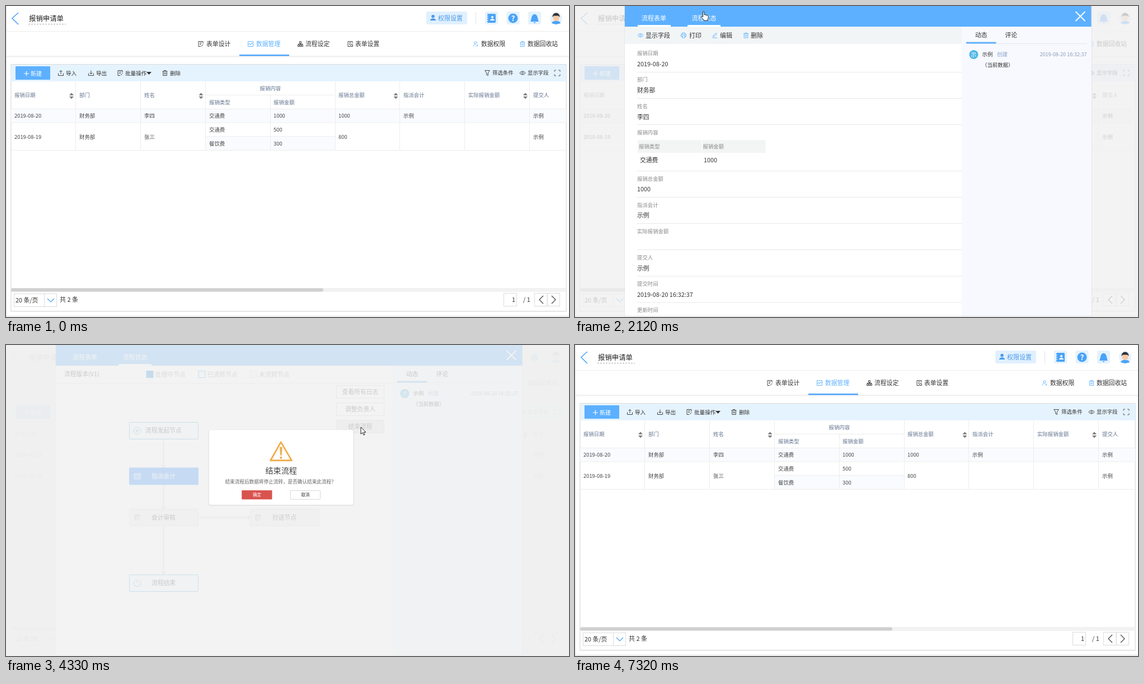
Animation of 1006 by 557 pixels, one loop 8.03 s. Source, as an HTML page:

```html
<!DOCTYPE html>
<html lang="zh-CN">
<head>
<meta charset="utf-8">
<title>报销申请单</title>
<style>
html, body { margin: 0; width: 100%; height: 100%; overflow: hidden; background: #fff; }
svg { display: block; width: 1006px; height: 557px; }
text { font-family: "Noto Sans CJK SC", "Noto Sans CJK", sans-serif; }
#dialog { transform-origin: 491.7px 219px; }
</style>
</head>
<body>
<svg id="stage" viewBox="0 0 1006 557"></svg>
<script>
const BLUE = '#5cb0ff', INK = '#333', GREY = '#888', LINE = '#ededed';
const SMALL = 9.4, BODY = 10.8;

// --- drawing helpers: text is placed by its vertical centre ---
const text = (x, cy, str, size = BODY, fill = INK, anchor = 'start', extra = '') =>
  `<text x="${x}" y="${cy + size * .37}" font-size="${size}" fill="${fill}" text-anchor="${anchor}" ${extra}>${str}</text>`;
const rect = (x, y, w, h, fill, extra = '') =>
  `<rect x="${x}" y="${y}" width="${w}" height="${h}" fill="${fill}" ${extra}/>`;
const box = (x, y, w, h, stroke, fill = '#fff', extra = '') =>
  rect(x + .5, y + .5, w - 1, h - 1, fill, `stroke="${stroke}" ${extra}`);
const path = (d, stroke, width = 1, extra = 'fill="none"') =>
  `<path d="${d}" stroke="${stroke}" stroke-width="${width}" ${extra}/>`;
const hline = (x1, x2, y, color = LINE) => path(`M${x1} ${y}H${x2}`, color);
const vline = (x, y1, y2, color = LINE) => path(`M${x} ${y1}V${y2}`, color);
const group = (id, body) => `<g id="${id}">${body}</g>`;

// Line icons in a 10 x 10 cell, centred on (x + 5, cy)
const ICONS = {
  form: 'M9 4V.5H1V9.5H5M3 3H7M3 5.5H6M6 9L9.5 5.5',
  chart: 'M.5 .5H9.5V9.5H.5ZM1 6L3 4L5 7L7 3L9 5',
  tree: 'M3.5 .5H6.5V3.5H3.5ZM5 3.5V6.5M1.5 6.5V5H8.5V6.5M.5 6.5H3V9.5H.5ZM3.8 6.5H6.2V9.5H3.8ZM7 6.5H9.5V9.5H7Z',
  cog: 'M9 4V.5H1V9.5H5M3 3H7M3 5.5H5M6 6H9.5V9.5H6Z',
  user: 'M3 3A2.3 2.3 0 1 1 7 4.5C4 5 1.5 6.5 1 9.5M3 3C3 4.5 4 5 5 5M6 9.5L9.5 6M9.5 9.5L7 7',
  bin: 'M.5 2H9.5M3.5 2V.5H6.5V2M1.7 2V9.5H8.3V2M4 4V7.5M6 4V7.5',
  up: 'M.5 5.5V9.5H9.5V5.5M5 7V.5M2.5 3L5 .5L7.5 3',
  down: 'M.5 5.5V9.5H9.5V5.5M5 .5V7M2.5 4.5L5 7L7.5 4.5',
  filter: 'M.7 .5H9.3L6.3 5V9.5L3.7 8V5Z',
  eye: 'M0 5C2.5 1 7.5 1 10 5C7.5 9 2.5 9 0 5ZM5 3.5A1.5 1.5 0 1 1 4.9 3.5',
  expand: 'M0 3V0H3M7 0H10V3M10 7V10H7M3 10H0V7',
  print: 'M2.5 3V.5H7.5V3M2.5 7H.5V3H9.5V7H7.5M2.5 5.5H7.5V9.5H2.5Z',
  pen: 'M.5 9.5H9.5M1.5 7.5L2 5.5L7 .8L8.7 2.5L3.7 7Z',
  play: 'M5 -1A6 6 0 1 1 4.9 -1M3.5 2.5V7.5L7.5 5Z',
  power: 'M2 0A6 6 0 1 0 8 0M5 -1V4',
  grid: 'M-.5 1H10.5V10H-.5ZM-.5 3.5H10.5M2 5V9M5 5V9M8 5V9M2.5 -1V1M7.5 -1V1'
};
const icon = (name, x, cy, color = '#444') =>
  `<g transform="translate(${x} ${cy - 5})">${path(ICONS[name], color, .9)}</g>`;
const item = (name, x, tx, cy, label, size, color = INK, tint = color) =>
  icon(name, x, cy, tint) + text(tx, cy, label, size, color);

// --- list page ---
function header() {
  const tile = x => rect(x, 10, 23, 23, '#e4f2fe', 'rx="3"');
  return path('M22 12L11 22L22 33', '#4ba3f5', 1.6) +
    text(41, 22, '报销申请单', 12.4, '#222') +
    path('M40 32.5H107', '#aaa', 1, 'stroke-dasharray="3 2"') +
    rect(751, 10, 73, 23, '#e0f0fe', 'rx="3"') +
    '<circle cx="763" cy="18.5" r="2.8" fill="#4a9ae8"/>' +
    path('M758 26C758 21 768 21 768 26Z', 'none', 0, 'fill="#4a9ae8"') +
    text(772, 21.5, '权限设置', 11, '#4a9ae8') +
    vline(839.5, 11, 33, '#e3e3e3') +
    [856, 894.5, 933].map(tile).join('') +
    rect(860, 14, 15, 16, '#4aa3f7', 'rx="1.5"') + '<circle cx="869" cy="20" r="2" fill="#fff"/>' +
    path('M865 26C865 22 873 22 873 26Z', 'none', 0, 'fill="#fff"') +
    path('M859 18H862M859 22H862M859 26H862', '#fff', 1) +
    '<circle cx="906" cy="22" r="8.5" fill="#4aa3f7"/>' +
    text(906, 22, '?', 13, '#fff', 'middle', 'font-weight="700"') +
    path('M937 28C939 26 938 15 944.500 14.500C951 15 950 26 952 28ZM942 29H947L944.500 31Z', 'none', 0, 'fill="#4aa3f7"') +
    '<circle cx="983" cy="22" r="11" fill="#e4f2fe"/>' +
    path('M975 31C976 25 990 25 991 31L983 33Z', 'none', 0, 'fill="#4aa3f7"') +
    '<circle cx="983" cy="21.500" r="5.500" fill="#f8c9a4"/>' +
    path('M976.500 20C976 10 990 10 989.500 20L987 17.500H979Z', 'none', 0, 'fill="#30303a"') +
    hline(0, 1006, 45.5) +
    item('form', 343, 358, 68, '表单设计') +
    item('chart', 432, 447, 68, '数据管理', BODY, BLUE) +
    item('tree', 521, 535, 68, '流程设定') +
    item('cog', 610, 624, 68, '表单设置') +
    item('user', 834, 849, 68, '数据权限', BODY, INK, BLUE) +
    item('bin', 918, 932, 68, '数据回收站', BODY, INK, BLUE) +
    hline(0, 1006, 90, '#e4e4e4') + hline(0, 1006, 91.5, '#f5f5f5') +
    rect(417, 87, 89, 2.5, '#4ba5fb');
}

function toolbar() {
  return rect(9, 105, 992, 30, '#e5f3fe') +
    rect(17, 108, 62, 24, BLUE, 'rx="1"') +
    path('M32 121H41M36.5 116.500V125.500', '#fff', 1.2) +
    text(44, 121, '新建', 10, '#fff') +
    item('up', 93, 107, 120, '导入', 9.6) +
    item('down', 147, 161, 120, '导出', 9.6) +
    item('form', 199, 213, 120, '批量操作', 9.6) +
    path('M251 118H260L255.500 123Z', 'none', 0, 'fill="#333"') +
    item('bin', 279, 293, 120, '删除', 9.6) +
    item('filter', 855, 869, 120, '筛选条件', SMALL) +
    item('eye', 918, 932, 120, '显示字段', SMALL) +
    icon('expand', 980, 120, '#555');
}

function table() {
  const cell = (x, y, str, color = '#444') => text(x, y, str, SMALL, color);
  const head = (x, y, str) => cell(x, y, str, '#62748f');
  const sorter = x => path(`M${x - 4} 160L${x} 155.500L${x + 4} 160ZM${x - 4} 162L${x} 166.500L${x + 4} 162Z`, 'none', 0, 'fill="#7d7d7d"');
  const rows = [
    [197, [15, '2019-08-20'], [131, '财务部'], [247, '李四'], [363, '交通费'], [478, '1000'], [594, '1000'], [710, '示例'], [942, '示例']],
    [222, [363, '交通费'], [478, '500']],
    [234.5, [15, '2019-08-19'], [131, '财务部'], [247, '张三'], [594, '800'], [942, '示例']],
    [247, [363, '餐饮费'], [478, '300']]
  ];
  return rect(9, 184, 992, 25, '#f9fbfe', 'id="row"') + rect(356, 234, 232, 24, '#f9fbfe') +
    [124.5, 240.5, 356.5, 588.5, 703.5, 819.5, 935.5].map(x => vline(x, 135, 258)).join('') +
    vline(472.5, 160, 258) + hline(356, 588, 159.5) + hline(356, 588, 233.5) +
    [184.5, 209, 258.5].map(y => hline(9, 1001, y)).join('') +
    [[15, '报销日期'], [131, '部门'], [247, '姓名'], [594, '报销总金额'], [710, '指派会计'], [826, '实际报销金额'], [942, '提交人']]
      .map(([x, s]) => head(x, 160, s)).join('') +
    head(453.5, 147.5, '报销内容') + head(363, 172.5, '报销类型') + head(478, 172.5, '报销金额') +
    [117, 348.5, 696.5, 928].map(sorter).join('') +
    rows.map(([y, ...cells]) => cells.map(([x, s]) => cell(x, y, s)).join('')).join('');
}

function footer() {
  return rect(9, 505, 992, 7, '#f2f2f2') + rect(9, 505.5, 558, 6, '#d0d0d0', 'rx="3"') +
    box(14, 515, 77, 24, '#dcdcdc') + vline(68.5, 516, 538, '#dcdcdc') +
    path('M74 524L80 530L86 524', '#4aa3f7', 1.2) +
    text(17, 527.5, '20 条/页') + text(96, 526, '共 2 条', 11) +
    box(889, 514, 24, 24, '#dcdcdc') + text(904, 526, '1') + text(924, 526, '/ 1') +
    box(944, 514, 23.5, 24, '#dcdcdc') + box(967, 514, 23, 24, '#dcdcdc') +
    path('M960 519L953 526L960 533M975 519L982 526L975 533', '#444', 1.2);
}

const listPage = () => header() +
  rect(8, 104, 994, 444, '#f0f0f0', 'rx="2"') + box(8.5, 104, 993, 443, '#dadada') +
  toolbar() + table() + footer() +
  vline(.5, 0, 557, '#e2e2e2') + hline(0, 1006, 555.5, '#d8d8d8');

// --- record panel ---
function formView() {
  const fields = [
    [85, '报销日期', '2019-08-20', 118.5], [132, '部门', '财务部', 165.5], [180, '姓名', '李四', 212.5],
    [227, '报销内容', '', 295.5], [309.5, '报销总金额', '1000', 342.5], [356.5, '指派会计', '示例', 389.5],
    [404, '实际报销金额', '', 436.5], [451, '提交人', '示例', 484], [498, '提交时间', '2019-08-20 16:32:37', 531],
    [545, '更新时间', '', 600]
  ];
  return rect(89, 37, 602, 31, '#f1f5f6') +
    item('eye', 112, 126, 52.5, '显示字段', 11, INK, BLUE) + item('print', 189, 204, 52.5, '打印', 11, INK, BLUE) +
    item('pen', 245, 259, 52.5, '编辑', 11, INK, BLUE) + item('bin', 300.5, 314, 52.5, '删除', 11, INK, BLUE) +
    fields.map(([y, label, value, rule]) => text(111, y, label, SMALL, GREY) +
      text(111, y + 19, value) + hline(111, 691, rule, '#e8e8e8')).join('') +
    rect(112, 240, 114, 23, '#f3f4f4') + rect(227, 240, 113.5, 23, '#f3f4f4') +
    text(114, 251.5, '报销类型', SMALL, GREY) + text(228.5, 251.5, '报销金额', SMALL, GREY) +
    text(116, 276, '交通费') + text(230, 276, '1000');
}

function flowView() {
  const legend = (x, label, stroke, fill) => box(x, 46, 13, 13, stroke, fill) + text(x + 16, 52.5, label, 10.9, GREY);
  const node = (x, y, label, glyph, stroke, fill, color = INK) => box(x, y, 124, 31, stroke, fill, 'rx="1"') +
    icon(glyph, x + 9.5, y + 15.5, color === '#fff' ? color : stroke === '#dcdcdc' ? '#8a7f7f' : '#4490b8') +
    text(x + 61.5, y + 15.5, label, BODY, color, 'middle');
  const button = (y, label, id) => box(590, y, 86, 24, '#cdcdcd', '#fff', `id="${id}"`) + text(633, y + 12, label, BODY, INK, 'middle');
  const arrowDown = (y1, y2) => path(`M281.500 ${y1}V${y2}M277.500 ${y2 - 4}L281.500 ${y2}L285.500 ${y2 - 4}`, '#d4d4d4', 1.6);
  return text(104, 52.5, '流程版本(V1)') + hline(89, 691, 68.5, '#e2e2e2') +
    legend(250.5, '处理中节点', '#1a8ce0', '#1a8ce0') + legend(343.5, '已流转节点', '#3ba3e0', '#f0fdff') +
    legend(436, '未流转节点', '#dedede', '#fafafa') +
    button(72, '查看所有日志', 'log') + button(103, '调整负责人', 'owner') + button(134, '结束流程', 'finish') +
    arrowDown(168, 219) + arrowDown(250, 293) + arrowDown(324, 410) +
    path('M344 309H436M432 305L436 309L432 313', '#d4d4d4', 1.6) +
    node(220, 138, '流程发起节点', 'play', '#3a9fd8', '#effdff') +
    node(220, 219.5, '指派会计', 'grid', '#1e88ff', '#1e88ff', '#fff') +
    node(220, 293.5, '会计审核', 'form', '#dcdcdc', '#f0f0f0') +
    node(436, 293.5, '抄送节点', 'form', '#dcdcdc', '#f0f0f0') +
    node(220, 411, '流程结束', 'power', '#3a9fd8', '#effdff');
}

function panel() {
  return rect(88, 0, 836, 556, '#000', 'opacity=".05"') + rect(89, 0, 833.5, 555, '#fff') +
    rect(691, 37, 231.5, 518, '#f7f9fe') + rect(89, 0, 833.5, 37, BLUE) +
    text(119, 21.5, '流程表单', 11, '#fff') + text(208.5, 21.5, '流程状态', 11, '#fff') +
    rect(112, 34, 59, 3, '#fff', 'id="tabForm"') + rect(201, 34, 59, 3, '#fff', 'id="tabFlow"') +
    path('M894.500 10L911.500 27M911.500 10L894.500 27', '#fff', 1.8) +
    group('form', formView()) + group('flow', flowView()) +
    text(715, 52.5, '动态') + text(768.5, 52.5, '评论') +
    hline(699, 915, 67.5, '#e2e7ee') + rect(699, 64.5, 53.5, 2.8, BLUE) +
    '<circle cx="712.500" cy="87" r="8" fill="#4cb8e6"/>' + text(712.5, 87, '示', 10, '#fff', 'middle') +
    text(727.5, 87, '示例', SMALL) + text(754, 87, '创建', SMALL, '#8aa0cc') +
    text(914.5, 87, '2019-08-20 16:32:37', 9.1, '#8a9ab8', 'end') + text(727, 106, '（当前数据）', SMALL);
}

const dialog = () =>
  rect(306, 123, 371.5, 194, '#000', 'rx="5" opacity=".1"') + rect(307, 123, 369.5, 192.5, '#fff', 'rx="4" stroke="#ddd" stroke-width=".6"') +
  path('M491 154.500L464.500 201.500H518.500Z', '#f0ad4e', 4, 'fill="none" stroke-linejoin="round"') +
  path('M488.500 167.500H494L492.800 188H489.700Z', '#f0ad4e', 1, 'fill="#f0ad4e" stroke-linejoin="round"') +
  '<circle cx="491.200" cy="194.500" r="3" fill="#f0ad4e"/>' +
  text(491.7, 227, '结束流程', 20.2, '#444', 'middle') +
  text(348.5, 255.5, '结束流程后数据将停止流转，是否确认结束此流程？', 12.35, '#666') +
  rect(391, 278, 77.5, 23, '#d9534f', 'id="ok" rx="1"') + text(430, 290, '确定', BODY, '#fff', 'middle') +
  box(515, 278, 77, 23.5, '#c8c8c8', '#fff', 'rx="1"') + text(553.5, 290, '取消', BODY, INK, 'middle');

const cursors = () =>
  group('arrow', path('M0 0V12.500L3 9.800L5 14.300L7 13.400L5 9.200H9Z', '#222', 1, 'fill="#fff"')) +
  group('hand', path('M-1.400 1C-1.400 -.5 1.200 -.5 1.200 1V6C2.500 5 3.700 5.500 3.700 6.500C5 5.700 6 6.300 6 7.200C7.500 6.500 8.500 7.200 8.300 8.500C8.300 12 7.500 13 7 16H0C-.5 13.500 -4 11 -4.200 9C-4 7.500 -2.500 8 -1.400 9.500Z', '#222', 1, 'fill="#fff"')) +
  group('beam', path('M-3 -6.500H-1L0 -5.500L1 -6.500H3M0 -5.500V5.500M-3 6.500H-1L0 5.500L1 6.500H3', '#333', 1.2));

const veil = id => rect(0, 0, 1006, 557, '#f0f0f0', `id="${id}"`);
const stage = document.getElementById('stage');
stage.innerHTML = listPage() + veil('veil') + group('panel', panel()) + veil('veil2') +
  group('dialog', dialog()) + '<circle id="ripple" fill="#f0653c"/>' + group('cursor', cursors());

const LOOP = 8030, TICK = 78.7;
const OPEN = 13, SWITCH = 32, ASK = 55, CLOSE = 69;
const track = [[1, 436, 285], [7, 253, 203], [16, 253, 203], [23, 230, 10], [38, 230, 10],
  [39, 258, 25], [49, 634, 147], [58, 634, 147], [65, 435, 285], [102, 435, 285]];
const zoom = [[0, .7], [.45, 1.05], [.8, .95], [1, 1]];
const clicks = [28, 67];

const $ = id => document.getElementById(id);
const clamp = v => Math.max(0, Math.min(1, v));
const smooth = u => u * u * (3 - 2 * u);
const show = (id, on) => $(id).setAttribute('display', on ? 'inline' : 'none');
const set = (id, attrs) => { for (const a in attrs) $(id).setAttribute(a, attrs[a]); };

function sample(keys, t, ease) {
  let i = 0;
  while (i < keys.length - 2 && t >= keys[i + 1][0]) i++;
  const [a, b] = [keys[i], keys[i + 1]];
  const u = ease(clamp((t - a[0]) / (b[0] - a[0])));
  return a.slice(1).map((v, n) => v + (b[n + 1] - v) * u);
}

function draw(ms) {
  const k = Math.floor((ms + 12) / TICK);
  const asking = k >= ASK && k < CLOSE;
  const veilFade = k < OPEN ? 0 : k < CLOSE ? 1 : k < 71 ? .6 : clamp((74 - k) * .15);
  set('veil', { opacity: .8 * veilFade });
  set('row', { fill: k >= 6 && k < OPEN ? '#fafafa' : '#f9fbfe' });

  show('panel', k >= OPEN && k < CLOSE);
  show('form', k < SWITCH);
  show('flow', k >= SWITCH);
  show('tabForm', k < SWITCH);
  show('tabFlow', k >= 23);
  set('finish', { fill: k >= 48 ? '#e6e6e6' : '#fff' });

  set('veil2', { opacity: asking ? .8 : 0 });
  show('dialog', asking);
  const [scale] = sample(zoom, clamp((k - ASK) * TICK / 300), u => u);
  $('dialog').style.transform = `scale(${scale})`;
  set('ok', { fill: k >= 64 ? '#d2322d' : '#d9534f' });

  const [x, y] = sample(track, k, smooth);
  const age = k - (k < 40 ? clicks[0] : clicks[1]);
  show('ripple', age >= 0 && age < 3 && k !== CLOSE);
  set('ripple', { cx: x, cy: y, r: Math.min(9, 4 + 4 * age), opacity: .75 - Math.max(0, age - 1) * .35 });

  const beam = k >= 6 && k < OPEN;
  const hand = (k >= 22 && k <= 40) || (k >= 48 && k < ASK) || (k >= 64 && k < CLOSE);
  show('beam', beam);
  show('hand', hand);
  show('arrow', !beam && !hand);
  set('cursor', { transform: `translate(${x} ${y})`, opacity: Math.min(clamp(k / 3), clamp((93 - k) / 5)) });
}

function loop() {
  draw(performance.now() % LOOP);
  requestAnimationFrame(loop);
}
loop();
</script>
</body>
</html>
```
